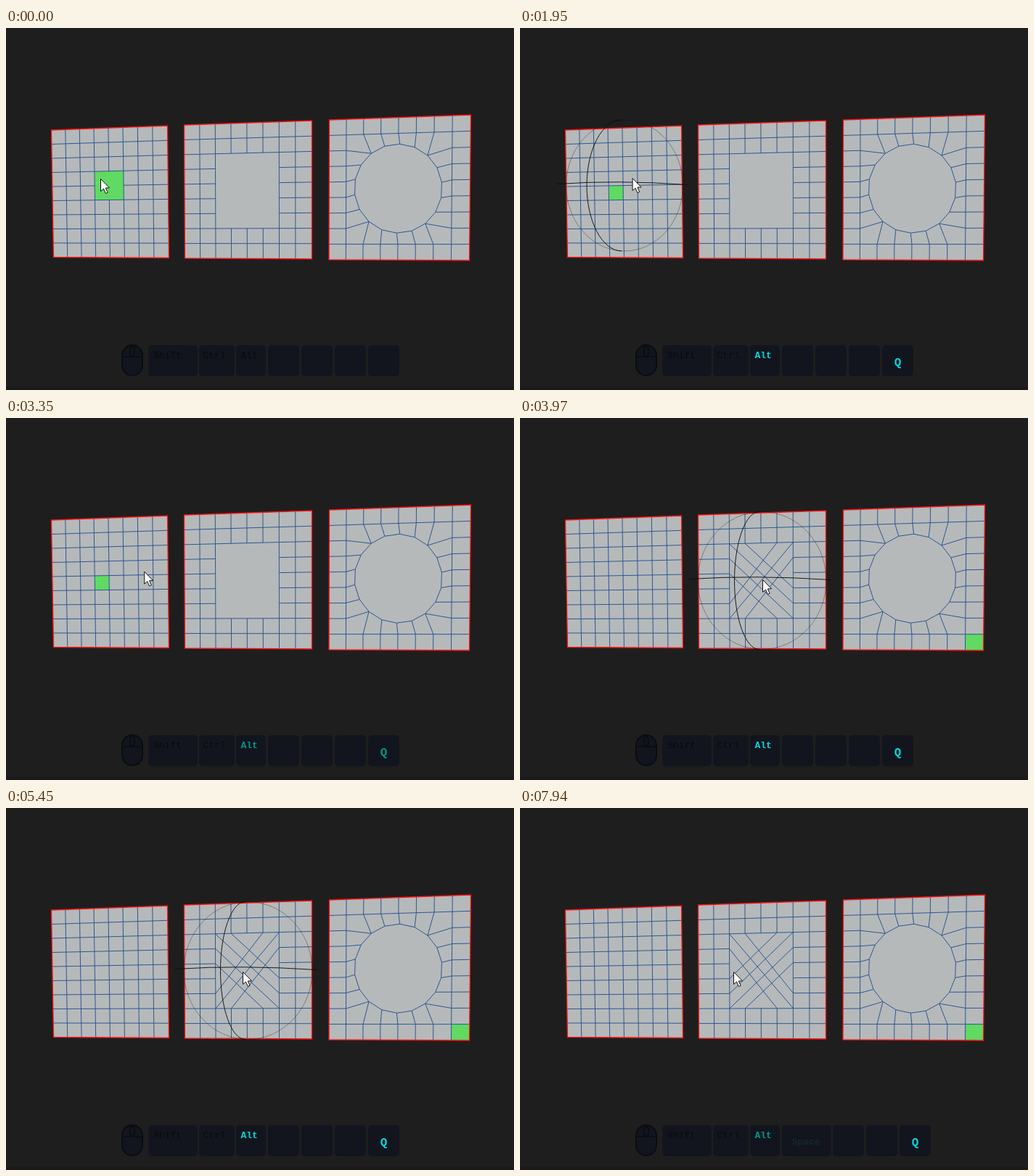
An HTML page with a canvas that plays this animation: 700x500 px, repeating every 8 s.

```html
<!DOCTYPE html>
<html>
<head>
<meta charset="utf-8">
<style>
html, body { margin: 0; width: 100%; height: 100%; overflow: hidden; background: #1e1e1e; }
canvas { display: block; }
</style>
</head>
<body>
<canvas id="stage" width="700" height="500"></canvas>
<script>
const ctx = document.getElementById('stage').getContext('2d');
const LOOP = 8000, COLS = 8, ROWS = 9;
const LIT = '#08d5dc', FADED = '#079489', FAINT = '#14282f', OFF = '#080a0e';
const FACE = '#b6b9ba', EDGE = '#245390', GREEN = '#60da62', INK = '#0a0c11';

// corners: top left, top right, bottom right, bottom left; hole: first column and row, last column and row
const meshes = [
  { corners: [[62, 140.5], [222, 134.5], [224, 317], [65, 316]], hole: [3, 3, 5, 5] },
  { corners: [[245, 133.5], [421, 127.5], [421, 318.5], [246, 317.5]], hole: [2, 2, 6, 7] },
  { corners: [[445, 126.5], [640, 119.5], [638, 320.5], [444.5, 319.5]], hole: [2, 2, 6, 7], round: true }
];

// start, duration, destination
const cursorMoves = [
  [390, 1, 133, 208], [1250, 780, 157, 207], [2490, 390, 118, 206], [3040, 930, 334, 223],
  [4200, 330, 415, 226], [4530, 450, 357, 223], [4980, 470, 326, 226], [5680, 620, 294, 226]
];

const mix = (a, b, k) => a + (b - a) * k;
const mixPoint = (p, q, k) => [mix(p[0], q[0], k), mix(p[1], q[1], k)];
const clamp = (v, low, high) => Math.max(low, Math.min(high, v));
const within = (t, a, b) => t >= a && t < b;

function cursorAt(t) {
  return cursorMoves.reduce((p, [start, time, ...goal]) =>
    mixPoint(p, goal, clamp((t - start) / time, 0, 1)), [130, 208]);
}

function trace(points, close) {
  ctx.beginPath();
  points.forEach(p => ctx.lineTo(...p));
  if (close) ctx.closePath();
}
function fill(points, color) {
  trace(points, true);
  ctx.fillStyle = color;
  ctx.fill();
}
function stroke(color, width) {
  ctx.strokeStyle = color;
  ctx.lineWidth = width;
  ctx.stroke();
}
function segment(p, q) {
  ctx.moveTo(...p);
  ctx.lineTo(...q);
}

function holeLoop([c0, r0, c1, r1]) {
  const loop = [];
  for (let c = c0; c < c1; c++) loop.push([c, r0]);
  for (let r = r0; r < r1; r++) loop.push([c1, r]);
  for (let c = c1; c > c0; c--) loop.push([c, r1]);
  for (let r = r1; r > r0; r--) loop.push([c0, r]);
  return loop;
}

for (const mesh of meshes) {
  const [tl, tr, br, bl] = mesh.corners, loop = holeLoop(mesh.hole);
  const leftHeight = bl[1] - tl[1], rightHeight = br[1] - tr[1];
  mesh.vertex = (c, r) => {
    const k = mesh.round ? loop.findIndex(p => p[0] === c && p[1] === r) : -1;
    if (k >= 0) {
      const a = (20 * k - 128) * Math.PI / 180;
      return [540 + 60.5 * Math.cos(a), 221.2 + 61.5 * Math.sin(a)];
    }
    // perspective: columns widen toward the taller, nearer side
    const u = c / COLS, near = u * leftHeight / mix(rightHeight, leftHeight, u);
    return mixPoint(mixPoint(tl, tr, near), mixPoint(bl, br, near), r / ROWS);
  };
  mesh.rim = loop.map(p => mesh.vertex(...p));
}

function drawMesh(mesh, filled, greenArea) {
  const { vertex: v, hole: [c0, r0, c1, r1] } = mesh;
  fill(mesh.corners, FACE);
  if (greenArea) {
    const [a, b, c, d] = greenArea;
    fill([v(a, b), v(c, b), v(c, d), v(a, d)], GREEN);
  }
  ctx.beginPath();
  for (let r = 0; r <= ROWS; r++) {
    for (let c = 0; c <= COLS; c++) {
      const acrossHole = r > r0 && r < r1 && c >= c0 && c < c1;
      const downHole = c > c0 && c < c1 && r >= r0 && r < r1;
      if (c < COLS && r > 0 && r < ROWS && (filled || !acrossHole)) segment(v(c, r), v(c + 1, r));
      if (r < ROWS && c > 0 && c < COLS && (filled || !downHole)) segment(v(c, r), v(c, r + 1));
    }
  }
  stroke(EDGE, 0.95);
  trace(mesh.corners, true);
  stroke('#ff1414', 1.3);
}

// Grid fill of a rim: two families of lines whose sizes depend on the span.
function drawGridFill(rim, span) {
  const start = 2, half = rim.length / 2, n = i => rim[i % rim.length];
  ctx.beginPath();
  for (let i = 1; i < span; i++) segment(n(start + i), n(start + half + span - i));
  for (let j = 1; j < half - span; j++) segment(n(start + span + j), n(start + 2 * half - j));
  stroke(EDGE, 0.95);
}

function drawSphere(x, y, rx, ry, meridian) {
  ctx.beginPath();
  ctx.ellipse(x, y, rx, ry, 0, 0, 7);
  stroke('rgba(20,20,20,.45)', 0.8);
  ctx.beginPath();
  ctx.ellipse(x - 4, y, meridian - 4, ry, 0, Math.PI / 2, Math.PI * 1.5);
  stroke('#080808', 0.9);
  ctx.beginPath();
  ctx.moveTo(x - rx - 12, y - 2);
  ctx.quadraticCurveTo(x - 10, y - 8, x + rx + 6, y - 1);
  stroke('#0a0a0a', 0.9);
}

function label(text, x, y, color, size = 13, align = 'left') {
  ctx.font = `${color === OFF ? '' : 'bold '}${size}px "Liberation Mono", monospace`;
  ctx.textAlign = align;
  ctx.fillStyle = color;
  ctx.fillText(text, x, y);
}
function key(x, w, h = 43, radius = 5) {
  ctx.beginPath();
  ctx.roundRect(x, 438, w, h, radius);
  ctx.fillStyle = '#12151d';
  ctx.fill();
}

function drawMouse(pressed) {
  key(160, 28, 42, 14);
  if (pressed) {
    ctx.save();
    ctx.clip();
    ctx.fillStyle = LIT;
    ctx.fillRect(160, 438, 10.5, 15);
    ctx.restore();
  }
  stroke(INK, 2);
  trace([[160, 454], [188, 454]]);
  ctx.roundRect(171, 440, 6, 13, 3);
  stroke(INK, 1.6);
}

function drawKeys(t) {
  const idle = within(t, 3270, 3890);
  drawMouse(within(t, 230, 390) || within(t, 3580, 3660));
  key(196, 68);
  key(266, 49);
  key(317, 41);
  label('Shift', 203, 456, OFF);
  label('Ctrl', 271.5, 456, OFF);
  label('Alt', 323.5, 456, t < 860 ? OFF : idle || t >= 7940 ? FADED : LIT);

  // the pressed space key slides left through the slots and fades
  const spaceSlot = t < 6460 ? -1 : t < 6690 ? 2 : t < 7780 ? 1 : 0;
  let x = 361;
  for (let slot = 0; slot < 4; slot++) {
    const wide = slot === spaceSlot, w = wide ? 68 : 43;
    key(x, w);
    if (wide) label('Space', x + 33, 465, [FAINT, FADED, LIT][slot], 13, 'center');
    if (slot === 3 && t >= 1250) label('Q', x + 21.5, 467, idle ? FADED : LIT, 16, 'center');
    x += w + (wide ? 2 : 3);
  }
}

function drawCursor([x, y]) {
  const shape = [[0, 0], [0, 17], [4, 13.5], [6.8, 20], [9.6, 18.8], [6.8, 12.5], [12, 12.3]];
  fill(shape.map(p => [x + p[0], y + p[1]]), '#fff');
  stroke('#111', 1);
}

function draw(t) {
  ctx.fillStyle = '#1e1e1e';
  ctx.fillRect(0, 0, 700, 500);
  ctx.fillStyle = '#1a1a1a';
  ctx.fillRect(0, 496, 700, 4);
  drawKeys(t);

  const [left, middle, right] = meshes, cursor = cursorAt(t), filled = t >= 3890;
  ctx.save();
  ctx.translate(0.5, 0.5);
  drawMesh(left, t >= 1250, t < 1250 ? left.hole : t < 3580 ? [3, 4, 4, 5] : null);
  drawMesh(middle, false, within(t, 3580, 3890) ? middle.hole : null);
  drawMesh(right, false, filled ? [7, 8, 8, 9] : null);
  if (filled) {
    const span = clamp(Math.round((387 - cursor[0]) / 14), 1, 5);
    drawGridFill(middle.rim, within(t, 6460, 7230) ? span - 1 : span);
  }
  if (within(t, 1250, 3270)) drawSphere(143.5, 217, 80.5, 90.5, 52);
  if (filled && t < 7940) drawSphere(333, 224, 88.5, 95, 38);
  drawCursor(cursor);
  ctx.restore();
}

const began = performance.now();
function tick() {
  draw((performance.now() - began) % LOOP);
  requestAnimationFrame(tick);
}
tick();
</script>
</body>
</html>
```
